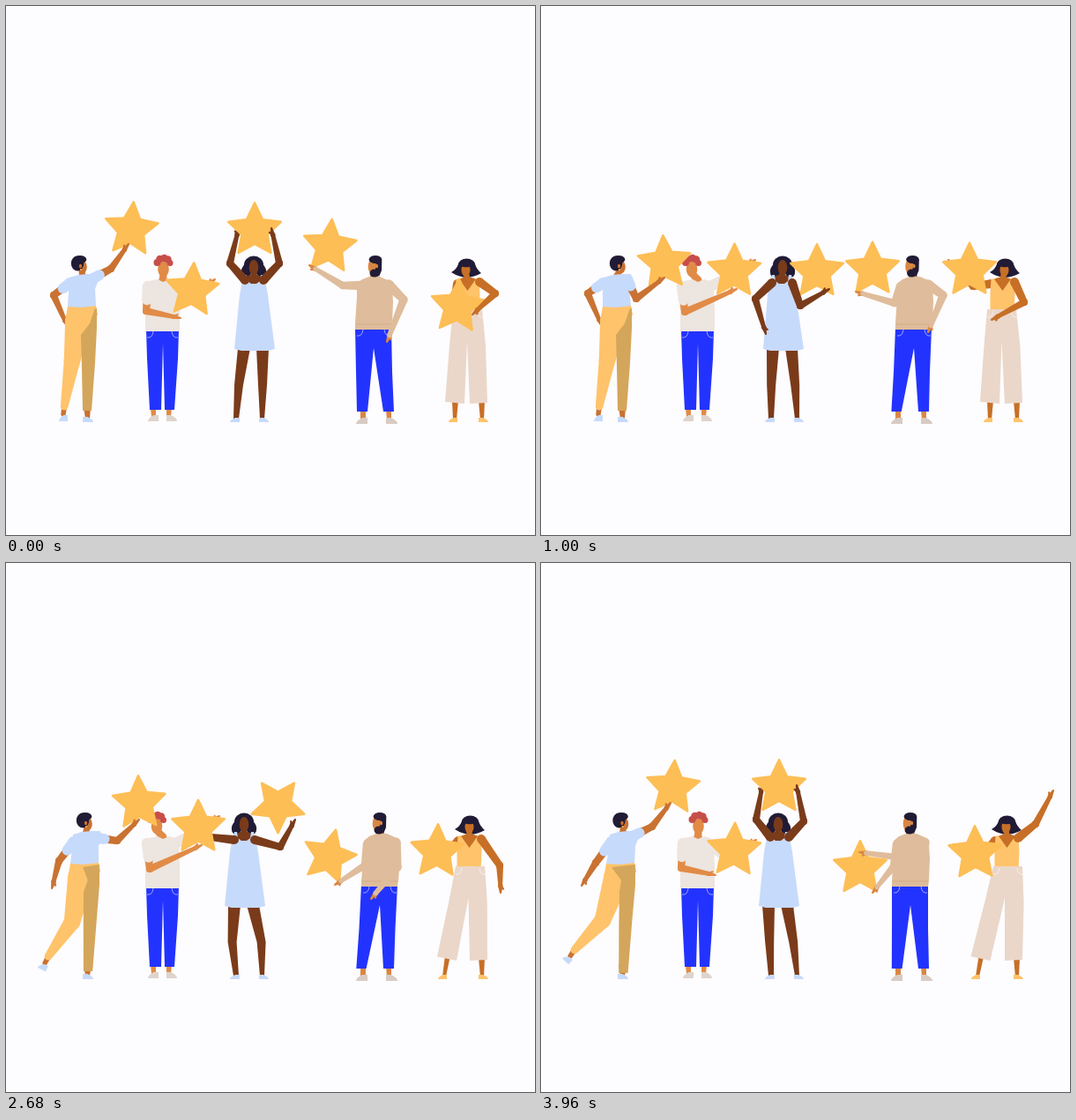
Write an HTML page with a canvas that moves like this. It is 600 by 600 pixels and loops after 4 s.

```html
<!DOCTYPE html>
<html lang="en">
<head>
<meta charset="utf-8">
<title>Five people with stars</title>
<style>
html, body { margin: 0; height: 100%; overflow: hidden; background: #fdfcfe; }
canvas { display: block; width: 100vw; height: 100vh; }
</style>
</head>
<body>
<canvas id="stage" width="600" height="600"></canvas>
<script>
const g = document.getElementById('stage').getContext('2d');
const LOOP = 4000, STEP = 40;
const TIMES = [0, 720, 1000, 1800, 2240, 2680, 3080, 3960];
const GOLD = '#fdbe55', INK = '#211b35', SKY = '#c6dafc', BLUE = '#2333ff';
const SHIRT = '#ede5df', SWEATER = '#dfbc9b', LINEN = '#ead7ca', YELLOW = '#ffc36b', OCHRE = '#d3a65b';

// ---- motion: seven poses per track, the fourth is held for a while ----
const track = rows => [...rows.slice(0, 4), ...rows.slice(3)];

// Limbs are stored as shoulder + two (angle, length) pairs so they swing in arcs.
function limbTrack(rows) {
  let last;
  return track(rows.map(([sx, sy, ex, ey, hx, hy]) => {
    const angles = [Math.atan2(ey - sy, ex - sx), Math.atan2(hy - ey, hx - ex)]
      .map((a, i) => last ? a + 2 * Math.PI * Math.round((last[i] - a) / (2 * Math.PI)) : a);
    last = angles;
    return [sx, sy, angles[0], Math.hypot(ex - sx, ey - sy), angles[1], Math.hypot(hx - ex, hy - ey)];
  }));
}

// Monotone cubic interpolation through the poses.
function at(rows, t) {
  const end = TIMES.length - 1;
  if (t >= TIMES[end]) return rows[end];
  const k = TIMES.findIndex((s, i) => t < TIMES[i + 1]);
  const dt = TIMES[k + 1] - TIMES[k], u = (t - TIMES[k]) / dt;
  return rows[k].map((a, c) => {
    const slope = i => (rows[i + 1][c] - rows[i][c]) / (TIMES[i + 1] - TIMES[i]);
    const tangent = i => {
      if (i === 0 || i === end) return 0;
      const p = slope(i - 1), q = slope(i);
      return p * q > 0 ? 2 * p * q / (p + q) : 0;
    };
    const b = rows[k + 1][c], m = tangent(k) * dt, n = tangent(k + 1) * dt;
    return a + u * (m + u * (3 * (b - a) - 2 * m - n + u * (2 * (a - b) + m + n)));
  });
}

// ---- shapes ----
function poly(color, ...p) {
  g.fillStyle = color;
  g.beginPath();
  for (let i = 0; i < p.length; i += 2) g.lineTo(p[i], p[i + 1]);
  g.fill();
}
function oval(color, x, y, rx, ry = rx, turn = 0) {
  g.fillStyle = color;
  g.beginPath();
  g.ellipse(x, y, rx, ry, turn, 0, 7);
  g.fill();
}
function taper(color, x1, y1, r1, x2, y2, r2) {
  const a = Math.atan2(y2 - y1, x2 - x1), s = Math.sin(a), c = Math.cos(a);
  oval(color, x1, y1, r1);
  oval(color, x2, y2, r2);
  poly(color, x1 - s * r1, y1 + c * r1, x2 - s * r2, y2 + c * r2,
    x2 + s * r2, y2 - c * r2, x1 + s * r1, y1 - c * r1);
}
function star([x, y, turn]) {
  g.save();
  g.translate(x, y);
  g.rotate(turn * Math.PI / 180);
  g.beginPath();
  for (let i = 0; i < 10; i++) {
    const r = i % 2 ? 15.3 : 31.3, a = i * Math.PI / 5;
    g.lineTo(r * Math.sin(a), -r * Math.cos(a));
  }
  g.closePath();
  g.fillStyle = g.strokeStyle = GOLD;
  g.lineWidth = 2.5;
  g.lineJoin = 'round';
  g.fill();
  g.stroke();
  g.restore();
}
// cover: share of the upper arm under a sleeve; 2 means sleeved to the wrist
function arm(skin, [sx, sy, a, upper, b, fore], cloth, cover = 0, size = 1) {
  const ex = sx + upper * Math.cos(a), ey = sy + upper * Math.sin(a);
  const hx = ex + fore * Math.cos(b), hy = ey + fore * Math.sin(b);
  const wx = hx - 8 * Math.cos(b), wy = hy - 8 * Math.sin(b);
  const main = cover === 2 ? cloth : skin;
  taper(skin, wx, wy, 2.7, hx, hy, 1.1);
  taper(skin, wx, wy, 1.8, wx + 5 * Math.cos(b - .7), wy + 5 * Math.sin(b - .7), 1);
  taper(main, sx, sy, 5 * size, ex, ey, 4 * size);
  taper(main, ex, ey, 4 * size, wx, wy, 2.4 * size);
  if (cover && cover < 2)
    taper(cloth, sx, sy, 6.2, sx + (ex - sx) * cover, sy + (ey - sy) * cover, 5.8);
}
function shoe(color, x, y, dir, w = 11, h = 5) {
  g.fillStyle = color;
  g.beginPath();
  g.moveTo(x, y);
  g.lineTo(x, y - h);
  g.lineTo(x + dir * w * .45, y - h);
  g.quadraticCurveTo(x + dir * w, y - h * .5, x + dir * w, y);
  g.fill();
}
function pockets(left, right, y) {
  g.strokeStyle = '#ffffffb0';
  g.lineWidth = .8;
  for (const [x, d] of [[left, 1], [right, -1]]) {
    g.beginPath();
    g.moveTo(x + d, y + 8);
    g.quadraticCurveTo(x + d * 7, y + 9, x + d * 8, y + 1);
    g.stroke();
  }
}

// ---- poses: body rows are [head x, shoulder shift, hip shift, extra] ----
const one = {
  skin: '#c97232',
  body: track([[82.5, 0, 0], [82.5, 0, 0], [86.5, -1, 0], [86.5, -1, -1], [88.5, 4, 3], [90, 6, 4], [90, 6, 4]]),
  star: track([[142, 253.5, 5], [142.5, 255, 5], [140, 291.5, -3], [130, 300.5, 0], [151, 272.5, -2], [149.5, 256, 3], [149.5, 255, 4]]),
  back: limbTrack([[73, 314, 54, 328, 70, 364], [72, 314, 54, 328, 70, 364], [71, 314, 53, 326, 69, 363],
    [71, 314, 53, 326, 69, 362], [77, 316, 60, 338, 52, 369], [80, 316, 62, 340, 46, 366], [80, 316, 62, 340, 46, 366]]),
  front: limbTrack([[99, 309, 119, 298, 139, 270], [99, 309, 119, 298, 139, 271], [98, 310, 108, 332, 140, 308],
    [97, 310, 106, 334, 130, 318], [104, 312, 126, 315, 151, 291], [104, 310, 126, 299, 147, 273], [104, 310, 126, 299, 147, 272]]),
  leg: limbTrack([[82, 357, 75, 402, 65, 461], [82, 357, 75, 402, 65, 461], [82, 357, 75, 402, 65, 461],
    [82, 357, 75, 402, 65, 461], [85, 357, 75, 407, 44, 452], [86, 357, 70, 405, 33, 444], [86, 357, 70, 405, 33, 444]])
};
const two = {
  skin: '#e18b47',
  body: track([[178.5, 0], [172.5, 1], [171, 0], [170, 0], [171, 0], [175, 0], [178.5, 0]]),
  star: track([[211, 322.5, 4], [217.5, 307.5, -2], [219, 301, 1], [218, 300, 0], [218, 300, 0], [222, 303, -1], [219, 326, 2]]),
  back: limbTrack([[191, 319, 208, 332, 237, 310], [192, 318, 212, 315, 242, 293], [192, 318, 212, 308, 243, 288],
    [192, 318, 212, 308, 242, 287], [192, 318, 212, 308, 242, 287], [192, 318, 215, 312, 244, 293], [191, 319, 212, 335, 244, 314]]),
  front: limbTrack([[161, 318, 159, 346, 198, 354], [160, 318, 163, 347, 222, 325], [160, 318, 163, 347, 222, 321],
    [160, 318, 163, 347, 222, 320], [160, 318, 163, 347, 222, 320], [160, 318, 163, 347, 224, 323], [161, 318, 159, 346, 198, 354]])
};
const three = {
  skin: '#7a3b1a',
  body: track([[281, 0, 0, 0], [281, 0, -1, 0], [274, -8, -7, 0], [270, -11, -11, 0], [270, -11, -11, 3], [269, -12, -12, 0], [269, -12, -12, 0]]),
  star: track([[282, 254.5, 0], [318, 294.5, -13], [313, 301.5, 0], [307, 301.5, 1], [308.5, 275, -36], [275, 251.5, -70], [270, 254.5, -72]]),
  left: limbTrack([[271, 311, 254, 292, 264, 252], [271, 313, 242, 321, 233, 364], [262, 314, 243, 332, 255, 372],
    [259, 314, 239, 331, 250, 369], [259, 314, 232, 311, 212, 284], [260, 311, 244, 289, 240, 248], [260, 311, 244, 291, 251, 252]]),
  right: limbTrack([[292, 311, 310, 292, 301, 252], [292, 314, 309, 336, 339, 310], [285, 314, 294, 340, 327, 321],
    [282, 314, 289, 340, 322, 321], [282, 314, 311, 322, 328, 291], [281, 311, 298, 291, 293, 250], [281, 311, 298, 293, 290, 252]])
};
const four = {
  skin: '#d98743',
  body: track([[418, 0, 0], [419, 4, 4], [420.5, 6, 6], [421, 7, 7], [423, 8, 7], [423, 7, 7], [418, 2, 2]]),
  star: track([[367, 273, 5], [374, 298, 0], [376, 299, 0], [377, 299, -1], [366.5, 333, 14], [367, 346.5, 0], [362, 346.5, 0]]),
  left: limbTrack([[402, 317, 382, 317, 344, 294], [406, 318, 398, 335, 355, 323], [408, 318, 401, 337, 357, 324],
    [409, 318, 402, 337, 358, 324], [410, 319, 407, 343, 373, 365], [409, 319, 405, 344, 381, 374], [404, 319, 400, 344, 376, 374]]),
  right: limbTrack([[434, 316, 451, 333, 432, 381], [437, 316, 454, 331, 437, 379], [439, 316, 456, 328, 439, 370],
    [440, 316, 457, 327, 441, 368], [442, 317, 444, 345, 414, 381], [440, 317, 434, 338, 366, 332], [435, 317, 429, 337, 361, 328]])
};
const five = {
  skin: '#c76f26',
  body: track([[522, 0, 0, 0], [527, 0, -1, 0], [526, 0, -1, 0], [526, 0, -1, 0], [526, 2, 3, -12], [527, 5, 6, -14], [528, 5, 6, -14]]),
  star: track([[512, 341, 4], [487, 308.5, 0], [486, 300, 0], [486, 300, 0], [489, 327.5, 2], [492, 330, -2], [492.5, 329.5, -1]]),
  left: limbTrack([[512, 315, 508, 337, 486, 331], [511, 315, 490, 322, 461, 294], [511, 315, 490, 318, 462, 288],
    [511, 315, 490, 318, 462, 288], [513, 315, 498, 330, 463, 317], [515, 315, 500, 332, 468, 319], [515, 315, 500, 332, 468, 319]]),
  right: limbTrack([[537, 313, 555, 326, 529, 350], [537, 313, 548, 335, 511, 356], [537, 313, 548, 336, 511, 356],
    [537, 313, 548, 336, 511, 356], [539, 313, 560, 343, 561, 374], [541, 312, 560, 293, 572, 253], [541, 312, 561, 296, 581, 258]])
};

// ---- people ----
function drawThree(t) {
  const { skin } = three, [head, top, hip, knee] = at(three.body, t), x = 281 + top;
  poly(skin, 263 + hip, 388, 277 + hip, 388, 269 + hip * .4 - knee, 430, 264, 468, 258, 468, 259 + hip * .4 - knee, 430);
  poly(skin, 284 + hip, 388, 298 + hip, 388, 296 + hip * .4 + knee, 430, 293, 468, 288, 468, 286 + hip * .4 + knee, 430);
  shoe(SKY, 265, 472, -1);
  shoe(SKY, 287, 472, 1);
  oval(INK, head, 293.5, 11, 10);
  oval(INK, head - 8, 300, 6, 8, .3);
  oval(INK, head + 8, 300, 6, 8, -.3);
  poly(skin, x - 11, 308, x - 4, 305, x + 4, 305, x + 11, 308, x + 12, 318, x - 12, 318);
  taper(skin, head, 301, 3.2, x, 309, 3.5);
  oval(skin, head, 296.5, 5.3, 8.5);
  poly(SKY, x - 11, 305, x - 8, 305, x - 7, 312, x - 3, 315, x + 3, 315, x + 7, 312, x + 8, 305, x + 11, 305,
    x + 14, 317, x + 16, 328, 305 + hip, 389, 297 + hip, 391, 267 + hip, 391, 259 + hip, 389, x - 16, 328, x - 14, 317);
  arm(skin, at(three.left, t));
  star(at(three.star, t));
  arm(skin, at(three.right, t));
}

function drawTwo(t) {
  const { skin } = two, [head, top] = at(two.body, t), x = 177 + top;
  arm(skin, at(two.back, t), SHIRT, .6);
  poly(skin, 164, 456, 170, 456, 170, 466, 165, 466);
  poly(skin, 182, 456, 188, 456, 187, 466, 182, 466);
  shoe('#ded4cd', 173, 471, -1, 12, 7);
  shoe('#ded4cd', 182, 471, 1, 12, 7);
  poly(BLUE, 159, 367, 196, 367, 195, 400, 191, 458, 180, 458, 178, 383, 176, 458, 163, 458, 160, 400);
  pockets(159, 196, 368);
  taper(skin, head, 303, 3.8, x + 1, 311, 4.5);
  poly(SHIRT, x - 21, 317, x - 15, 312, x - 5, 310, x + 1, 313, x + 8, 310, x + 15, 312, x + 19, 318, 197, 345, 197, 369, 158, 369, 158, 345);
  oval(skin, head, 298.5, 6.3, 8.8);
  for (const [dx, y, r] of [[-7, 291, 4], [-4, 287, 4.3], [1, 286, 4.2], [5, 287.5, 4.2], [7.5, 291.5, 3.5]])
    oval('#c74e49', head + dx, y, r);
  star(at(two.star, t));
  arm(skin, at(two.front, t), SHIRT, .55);
}

function drawOne(t) {
  const { skin } = one, [head, top, hip] = at(one.body, t), leg = at(one.leg, t);
  const [hx, hy, a, thigh, b, shin] = leg;
  const kx = hx + thigh * Math.cos(a), ky = hy + thigh * Math.sin(a);
  const along = d => [kx + d * Math.cos(b), ky + d * Math.sin(b)];
  const [ax, ay] = along(shin), kick = (65 - ax) / 32;
  arm(skin, at(one.back, t), SKY, .45);
  taper(skin, ...along(shin - 8), 3.2, ax, ay + 2, 2.6);
  g.save();
  g.translate(ax, ay + 2);
  g.rotate(kick * .75);
  shoe(SKY, 5, 8, -1, 10, 7);
  g.restore();
  poly(skin, 88, 455, 96 + hip * .4, 455, 95, 468, 90, 468);
  shoe(SKY, 87, 472, 1, 12, 6);
  taper(YELLOW, hx, hy, 15, kx, ky, 9.3);
  taper(YELLOW, kx, ky, 9.3, ...along(shin - 7), 4.3);
  poly(YELLOW, 70 + hip, 341, 102 + hip, 340, 104 + hip, 350, 95 + hip, 366, 68 + hip, 352);
  poly(OCHRE, 103 + hip, 342, 100 + hip - 24 * kick, 345, 95 + hip - 8 * kick, 360, 85 + hip, 373, 86 + hip * .6, 410,
    87 + hip * .3, 459 + kick * 6, 97 + hip * .4, 459 + kick * 6, 101 + hip * .6, 405, 103 + hip, 365);
  taper(skin, head + 3, 299, 3, 87 + top, 307, 4);
  poly(SKY, 72 + top, 308, 82 + top, 305, 93 + top, 304, 103 + top, 304, 104 + top, 313, 101 + top, 321,
    102 + hip, 340, 85 + hip, 342, 70 + hip, 341, 71 + top, 325);
  oval(skin, head + 4, 296, 5.3, 7.5);
  oval(INK, head - 1.5, 292, 7.2, 8.5);
  oval(INK, head + 1.5, 287.5, 7.3, 4.5);
  oval(skin, head + 2, 295, 1.7, 2.2);
  oval(GOLD, head + 2.5, 299, 1);
  star(at(one.star, t));
  arm(skin, at(one.front, t), SKY, .35);
}

function drawFour(t) {
  const { skin } = four, [head, top, hip] = at(four.body, t), x = 417 + top;
  poly(skin, 402, 458, 408, 458, 408, 469, 402, 469);
  poly(skin, 431, 458, 437, 458, 437, 469, 432, 469);
  shoe('#d8cbc3', 410, 474, -1, 13, 7);
  shoe('#d8cbc3', 431, 474, 1, 13, 7);
  poly(BLUE, 396 + hip, 365, 437 + hip, 365, 438 + hip * .5, 415, 440, 460, 428, 460, 417 + hip, 388,
    410 - hip * .2, 460, 398 - hip * .1, 460, 397 + hip * .5, 415);
  pockets(397 + hip, 437 + hip, 366);
  taper(skin, head, 302, 4, x, 309, 4.5);
  poly(SWEATER, x - 19, 315, x - 13, 310, x - 5, 307, x + 7, 307, x + 16, 311, x + 21, 319, x + 22, 335,
    438 + hip, 360, 437 + hip, 367, 396 + hip, 367, 396 + hip, 360, x - 19, 330);
  oval(skin, head - 2.5, 295.5, 4.8, 8.5);
  oval(INK, head + 1, 287.5, 7.3, 4.5);
  poly(INK, head + 2, 287, head + 8.3, 288, head + 8, 300, head + 5, 307, head + 1, 300);
  oval(INK, head, 303, 5.5, 4.6);
  oval(skin, head + 2.5, 295, 1.6, 2.3);
  g.strokeStyle = '#cfa884';
  g.lineWidth = .8;
  g.beginPath();
  g.moveTo(397 + hip, 361);
  g.lineTo(437 + hip, 361);
  g.stroke();
  star(at(four.star, t));
  arm(skin, at(four.left, t), SWEATER, 2, 1.05);
  arm(skin, at(four.right, t), SWEATER, 2, 1.15);
}

function drawFive(t) {
  const { skin } = five, [head, top, hip, step] = at(five.body, t), x = 523.5 + top;
  arm(skin, at(five.left, t));
  poly(skin, 506 + step * .7, 448, 513 + step * .8, 448, 511 + step, 469, 507 + step, 469);
  poly(skin, 536, 448, 543, 448, 542, 469, 538, 469);
  shoe(YELLOW, 512 + step, 472, -1, 10);
  shoe(YELLOW, 536, 472, 1, 11);
  poly(skin, x - 13, 311, x - 5, 308, x + 5, 308, x + 13, 311, x + 13, 325, x - 13, 325);
  taper(skin, head - .5, 302, 3.2, x, 311, 3.8);
  poly(YELLOW, x - 13, 310, x - 10, 309, x, 323, x + 10, 309, x + 13, 310, x + 14, 326, x + 13, 350, x - 14, 350, x - 14, 326);
  poly(LINEN, 507 + hip, 344, 540 + hip, 344, 544 + hip * .6, 385, 546, 450, 526, 451, 523 + hip * .5, 380,
    520 + step * .75, 451, 498 + step * .75, 449 + step * .2, 503 + hip * .5 + step * .2, 385);
  pockets(506 + hip, 542 + hip, 345);
  star(at(five.star, t));
  oval(INK, head + .5, 294.5, 10, 8);
  g.fillStyle = INK;
  g.beginPath();
  g.moveTo(head - 8, 291);
  g.quadraticCurveTo(head - 11, 299, head - 17, 302);
  g.quadraticCurveTo(head, 313, head + 17, 303);
  g.quadraticCurveTo(head + 12, 299, head + 9, 291);
  g.fill();
  taper(skin, head - .5, 302, 3, x, 310, 3.4);
  oval(skin, head - .5, 299.5, 5, 7.5);
  oval(INK, head, 292.5, 8, 3.8);
  arm(skin, at(five.right, t));
}

function frame(now) {
  const t = Math.floor(now % LOOP / STEP) * STEP;
  g.fillStyle = '#fdfcfe';
  g.fillRect(0, 0, 600, 600);
  for (const draw of [drawThree, drawTwo, drawOne, drawFour, drawFive]) draw(t);
}

const start = performance.now();
function tick() {
  frame(performance.now() - start);
  requestAnimationFrame(tick);
}
tick();
</script>
</body>
</html>
```
